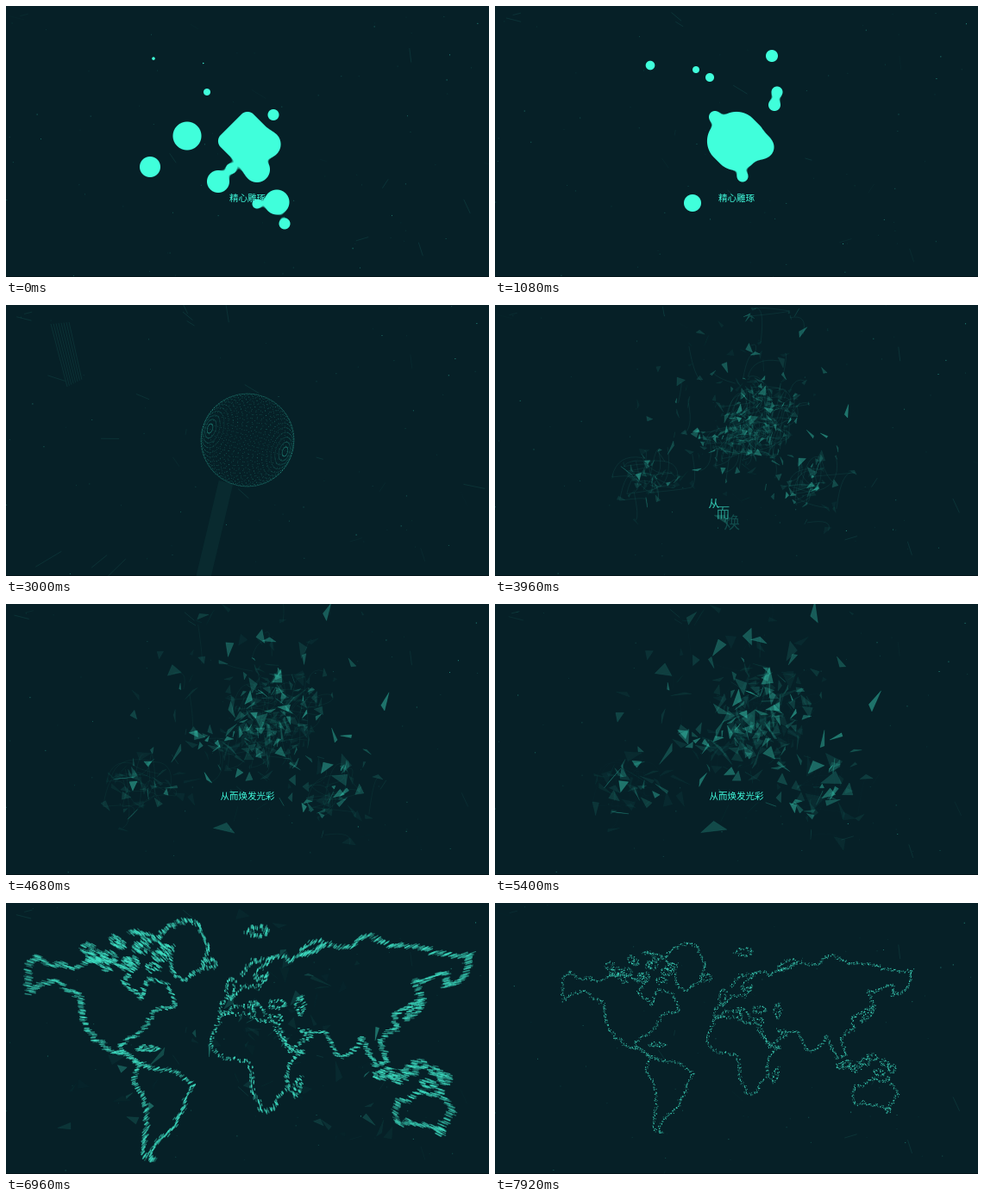
Recreate the animation shown at these times as an HTML page with a canvas. Size 560 by 315 pixels, loop 8000 ms.

```html
<!DOCTYPE html>
<html lang="zh-CN">
<head>
<meta charset="utf-8">
<style>
html, body { margin: 0; height: 100%; overflow: hidden; background: #062027; }
canvas { display: block; width: 100vw; height: 100vh; }
</style>
</head>
<body>
<canvas id="stage" width="560" height="315"></canvas>
<script>
const W = 560, H = 315, CX = 280, CY = 157, LOOP = 8000, STEP = 120, TAU = 2 * Math.PI;
const ctx = document.getElementById('stage').getContext('2d');
const blobCanvas = document.createElement('canvas');
blobCanvas.width = W;
blobCanvas.height = H;
const blobCtx = blobCanvas.getContext('2d');
const blobImage = blobCtx.createImageData(W, H);

const clamp = v => Math.max(0, Math.min(1, v));
const mix = (a, b, p) => a + (b - a) * p;
const ramp = (t, from, to) => clamp((t - from) / (to - from));
const teal = a => `rgba(64,225,197,${a})`;

let seed = 7;
function rand() {
  seed = (seed + 0x6D2B79F5) | 0;
  let n = Math.imul(seed ^ (seed >>> 15), 1 | seed);
  n = (n + Math.imul(n ^ (n >>> 7), 61 | n)) ^ n;
  return ((n ^ (n >>> 14)) >>> 0) / 4294967296;
}
const spread = () => rand() + rand() + rand() - 1.5;
const times = (n, make) => Array.from({ length: n }, (_, i) => make(i));

function line(x1, y1, x2, y2) {
  ctx.beginPath();
  ctx.moveTo(x1, y1);
  ctx.lineTo(x2, y2);
  ctx.stroke();
}

// Backdrop: drifting dust and short faint threads
const dust = times(70, () => ({
  x: rand() * W, y: rand() * H, vx: spread() * 5, vy: spread() * 5, a: .08 + .5 * rand() ** 4
}));
const threads = times(16, () => ({
  x: rand() * W, y: rand() * H, dx: spread() * 22, dy: spread() * 22, start: rand() * LOOP
}));

function drawBackdrop(t) {
  ctx.fillStyle = '#062027';
  ctx.fillRect(0, 0, W, H);
  for (const d of dust) {
    ctx.fillStyle = teal(d.a);
    ctx.fillRect(d.x + d.vx * t / 1000, d.y + d.vy * t / 1000, 1, 1);
  }
  ctx.lineWidth = .6;
  for (const l of threads) {
    const p = ((t + l.start) % 2000) / 2000;
    ctx.strokeStyle = teal(.18 * Math.sin(Math.PI * p));
    const x = l.x + l.dx * p, y = l.y + l.dy * p;
    line(x, y, x + l.dx, y + l.dy);
  }
  ctx.fillStyle = 'rgba(0,8,12,.5)';
  ctx.fillRect(0, H - 1, W, 1);
}

// Liquid drops (x, y, r) gathering into one ball in two waves
const firstWave = [
  [210, 151, 16.5], [167, 187, 12], [246, 204, 13], [233, 100, 4], [310, 126.5, 6.5],
  [314, 228, 14.5], [323, 253, 6.5], [291, 230, 5.5], [291, 190, 15], [261, 189, 6], [304, 162, 14]
];
const secondWave = [
  [180, 69, 5.3], [233, 74, 4], [249, 83, 5], [321, 58, 7], [327, 100, 6.5], [324, 115, 7],
  [229, 229, 10], [287, 198, 6.5], [310, 164, 13.5], [255, 129, 7]
];

function wave(drops, t, meet, delay, pace) {
  return drops.flatMap(([x, y, r], i) => {
    const u = (t - meet) / (delay + pace * Math.hypot(x - CX, y - CY));
    const k = u < 0 ? 1 + .09 * (meet - t) / meet : 1 - u ** 1.5;
    const size = meet ? r * ramp(t, i * 60 - 120, i * 60 + 240) : r;
    return u < 1 && size > 0 ? [[CX + (x - CX) * k, CY + (y - CY) * k, size]] : [];
  });
}

function smoothMin(a, b, k) {
  const h = Math.max(k - Math.abs(a - b), 0) / k;
  return Math.min(a, b) - h * h * k / 4;
}

function drawBlob(t) {
  const alpha = 1 - ramp(t, 1920, 2400);
  if (!alpha) return;
  const p = ramp(t, 0, 1080), q = ramp(t, 1080, 1920);
  const half = mix(27 + 5 * p, 54, q), corner = mix(10 + 17 * p, 54, q);
  const drops = [...wave(firstWave, t, 0, 300, 5), ...wave(secondWave, t, 1080, 220, 4)];
  const px = blobImage.data;
  for (let y = 0, i = 0; y < H; y++) {
    for (let x = 0; x < W; x++, i += 4) {
      const dx = x + .5 - CX, dy = y + .5 - CY;
      const a = Math.abs(dx + dy) * Math.SQRT1_2 - half + corner;
      const b = Math.abs(dx - dy) * Math.SQRT1_2 - half + corner;
      let d = Math.hypot(Math.max(a, 0), Math.max(b, 0)) + Math.min(Math.max(a, b), 0) - corner;
      for (const [bx, by, r] of drops) {
        d = smoothMin(d, Math.hypot(x + .5 - bx, y + .5 - by) - r, Math.min(9, r * 2));
      }
      px[i] = 64;
      px[i + 1] = 255;
      px[i + 2] = 219;
      px[i + 3] = 255 * clamp(.5 - d);
    }
  }
  blobCtx.putImageData(blobImage, 0, 0);
  ctx.globalAlpha = alpha;
  ctx.drawImage(blobCanvas, 0, 0);
  ctx.globalAlpha = 1;
}

// Dotted globe with a tilted axis
function drawGlobe(t) {
  const alpha = ramp(t, 1980, 2520) * (1 - ramp(t, 3360, 3720));
  if (!alpha) return;
  const R = 54 * (1 + .5 * ramp(t, 3360, 3720) ** 2), turn = t / 1500;
  const tilt = .3, lean = .56;
  for (let i = 1; i < 30; i++) {
    const lat = Math.PI * i / 30, ring = Math.sin(lat), along = Math.cos(lat);
    for (let j = 0; j < 56; j++) {
      const lon = turn + j * TAU / 56;
      const u = ring * Math.cos(lon), v = ring * Math.sin(lon);
      const x = along * Math.cos(lean) + u * Math.sin(lean);
      const sx = x * Math.cos(tilt) - v * Math.sin(tilt);
      const sy = x * Math.sin(tilt) + v * Math.cos(tilt);
      ctx.fillStyle = teal(.28 * alpha);
      ctx.fillRect(CX + R * sx - .4, CY + R * sy - .4, .8, .8);
    }
  }
  ctx.strokeStyle = teal(.22 * alpha);
  ctx.lineWidth = .8;
  ctx.beginPath();
  ctx.arc(CX, CY, R, 0, TAU);
  ctx.stroke();
}

// A faint beam, a ribbed panel and thin rays rushing past the globe
const rays = times(9, () => ({ angle: rand() * TAU, near: 110 + 150 * rand(), length: 12 + 25 * rand() }));

function drawStreaks(t) {
  const alpha = ramp(t, 2400, 2900) * (1 - ramp(t, 3120, 3480));
  if (!alpha) return;
  const k = 1 + (t - 3000) / 2500;
  ctx.save();
  ctx.globalAlpha = alpha;
  ctx.translate(CX, CY);
  ctx.scale(k, k);
  ctx.strokeStyle = teal(.05);
  ctx.lineWidth = 17;
  line(-25, 49, -52, 163);
  ctx.lineWidth = .7;
  ctx.strokeStyle = teal(.13);
  for (let i = 0; i < 8; i++) line(3 * i - 228, -135 - .3 * i, 2.4 * i - 209, -62 - 1.2 * i);
  for (const r of rays) {
    const c = Math.cos(r.angle), s = Math.sin(r.angle), far = r.near + r.length;
    line(c * r.near, s * r.near, c * far, s * far);
  }
  ctx.restore();
}

// Shards burst from the globe into loose clusters: x, y, radius, count
const clusters = [
  [318, 128, 55, 120], [285, 165, 50, 60], [165, 220, 45, 40], [310, 45, 105, 40], [375, 220, 55, 40], [285, 165, 150, 50]
];
const shards = clusters.flatMap(([x, y, r, count]) => times(count, () => {
  const angle = rand() * TAU, radius = 54 * Math.sqrt(rand()), heading = rand() * TAU;
  return {
    x: x + spread() * r, y: y + spread() * r,
    x0: CX + radius * Math.cos(angle), y0: CY + radius * Math.sin(angle),
    size: 5 + 7 * rand(), alpha: .05 + .42 * rand() ** 2.5, end: 5700 + 1500 * rand(),
    spin: spread() * .0012,
    corners: times(3, i => [heading + i * 2.1 + spread() * 1.8, .3 + rand()])
  };
}));

function drawShards(t) {
  if (t < 3360 || t > 7400) return;
  const burst = 1 - (1 - ramp(t, 3360, 4660)) ** 3;
  const drift = 1 + .3 * ramp(t, 5400, 7200);
  const growth = mix(.45, 1.1, ramp(t, 3400, 5200));
  const web = ramp(t, 3400, 3700) * (1 - ramp(t, 4200, 5600));
  let last = null;
  ctx.lineWidth = .5;
  for (const s of shards) {
    const x = CX + (mix(s.x0, s.x, burst) - CX) * drift;
    const y = CY + (mix(s.y0, s.y, burst) - CY) * drift;
    if (web && last && Math.hypot(x - last[0], y - last[1]) < 50) {
      ctx.strokeStyle = teal(.16 * web);
      ctx.beginPath();
      ctx.moveTo(...last);
      ctx.quadraticCurveTo(x + 6, last[1] - 5, x, y);
      ctx.stroke();
    }
    last = [x, y];
    const alpha = s.alpha * ramp(t, 3360, 3700) * (1 - ramp(t, s.end - 200, s.end + 200));
    if (!alpha) continue;
    ctx.beginPath();
    for (const [angle, reach] of s.corners) {
      const a = angle + s.spin * t, r = reach * s.size * growth;
      ctx.lineTo(x + r * Math.cos(a), y + r * Math.sin(a));
    }
    ctx.closePath();
    ctx.fillStyle = teal(alpha);
    ctx.fill();
    ctx.strokeStyle = teal(alpha * .7);
    ctx.stroke();
  }
}

// World map: a few key points per coast, roughened and speckled with dots
const mapDots = [];

function speckle(x1, y1, x2, y2) {
  const n = Math.ceil(Math.hypot(x2 - x1, y2 - y1) / .85);
  for (let i = 0; i < n; i++) {
    mapDots.push({
      x: mix(x1, x2, i / n) + spread() * 2, y: mix(y1, y2, i / n) + spread() * 2,
      a: .35 + .65 * rand(), r: .8 + .5 * rand()
    });
  }
}

function roughen(x1, y1, x2, y2) {
  const length = Math.hypot(x2 - x1, y2 - y1);
  if (length < 6) return speckle(x1, y1, x2, y2);
  const bend = spread() * .18;
  const mx = (x1 + x2) / 2 - (y2 - y1) * bend, my = (y1 + y2) / 2 + (x2 - x1) * bend;
  roughen(x1, y1, mx, my);
  roughen(mx, my, x2, y2);
}

function coast(points) {
  const p = points.split(' ').map(s => s.split(',').map(Number));
  for (let i = 1; i < p.length; i++) roughen(...p[i - 1], ...p[i]);
}

function isle(x, y, rx, ry, tilt = 0) {
  const at = a => [
    x + rx * Math.cos(a) * Math.cos(tilt) - ry * Math.sin(a) * Math.sin(tilt),
    y + rx * Math.cos(a) * Math.sin(tilt) + ry * Math.sin(a) * Math.cos(tilt)
  ];
  for (let i = 0; i < 8; i++) speckle(...at(i * TAU / 8), ...at((i + 1) * TAU / 8));
}

function archipelago(x, y, rx, ry, count) {
  for (let i = 0; i < count; i++) {
    const along = 2 * (i + .5) / count - 1;
    isle(x + along * rx, y + spread() * ry, 3 + 4 * rand(), 2 + 3 * rand(), spread());
  }
}

// Americas
coast('80,113 104,102 127,118 133,146 152,166 181,180 161,163 180,152 193,130 213,126 190,100 182,119 165,104 178,90 135,84 88,80 78,88 80,113');
coast('172,58 222,46 236,52 243,75 240,84 220,102 209,94 204,72 172,58');
coast('181,178 203,184 231,199 222,218 190,260 194,267 184,262 185,214 175,196 181,178');
archipelago(158, 76, 28, 12, 11);
archipelago(199, 80, 9, 14, 3);
isle(188, 165, 10, 2);
isle(245, 87, 6, 4);
// Africa
coast('254,136 279,133 305,142 320,167 331,167 315,190 317,202 303,220 290,221 283,200 280,176 258,173 246,158 254,136');
isle(325, 200, 3, 9, .3);
// Europe
coast('254,133 255,122 274,108 290,108 298,96 286,102 292,90 304,80 284,84 273,98');
coast('254,133 269,125 287,132 282,122 296,134 309,134 308,146');
isle(264, 109, 4, 9);
isle(307, 124, 8, 4);
isle(328, 125, 3, 9);
isle(289, 57, 10, 4);
// Asia and Australia
coast('305,79 318,85 352,69 392,60 418,70 484,78 482,92 460,108 462,95 432,102 440,120 414,132 416,148 401,158 406,178 396,180 384,155 362,172 352,150 328,147 338,153 318,166 308,147');
coast('417,213 438,203 452,209 457,202 467,222 456,238 428,231 418,235 417,213');
isle(338, 72, 12, 4, -.5);
isle(432, 130, 11, 3, -.8);
archipelago(430, 189, 34, 10, 9);
isle(456, 241, 3, 2);

const MAP_X = 277, MAP_Y = 148;
const zoomAt = t => 1 + .265 * (Math.max(0, 7920 - t) / 960) ** 1.8;

function drawMap(t) {
  const alpha = ramp(t, 6240, 6840);
  if (!alpha) return;
  const near = zoomAt(t + 35), far = zoomAt(t - 35);
  ctx.lineCap = 'round';
  for (const d of mapDots) {
    const dx = d.x - MAP_X, dy = d.y - MAP_Y;
    const streak = Math.hypot(dx, dy) * (far - near);
    ctx.strokeStyle = teal(alpha * d.a / (1 + .1 * streak));
    ctx.lineWidth = d.r * near;
    line(MAP_X + dx * near, MAP_Y + dy * near, MAP_X + dx * far + .05, MAP_Y + dy * far);
  }
  ctx.lineCap = 'butt';
}

// Captions: letters arrive from below, shrinking into place
function drawCaption(text, t, enter, leave) {
  const size = 10.5, left = CX - text.length * size / 2;
  ctx.textAlign = 'center';
  ctx.textBaseline = 'alphabetic';
  [...text].forEach((letter, i) => {
    const p = ramp(t, enter + i * 120, enter + i * 120 + 400);
    const alpha = p * (1 - ramp(t, leave + i * 80, leave + i * 80 + 300));
    if (!alpha) return;
    const px = size * (2 - p);
    ctx.font = `500 ${px}px "Noto Sans CJK SC", "Noto Sans CJK", sans-serif`;
    ctx.fillStyle = `rgba(64,250,220,${alpha})`;
    ctx.fillText(letter, left + (i + .5) * size, 223 + 37 * (1 - p) + px * .37);
  });
}

let shown = -1;
function tick(now) {
  const t = Math.floor((now % LOOP) / STEP) * STEP;
  if (t !== shown) {
    shown = t;
    drawBackdrop(t);
    drawStreaks(t);
    drawBlob(t);
    drawGlobe(t);
    drawShards(t);
    drawMap(t);
    drawCaption('精心雕琢', t, -2000, 1560);
    drawCaption('从而焕发光彩', t, 3640, 6000);
  }
  requestAnimationFrame(tick);
}
requestAnimationFrame(tick);
</script>
</body>
</html>
```
